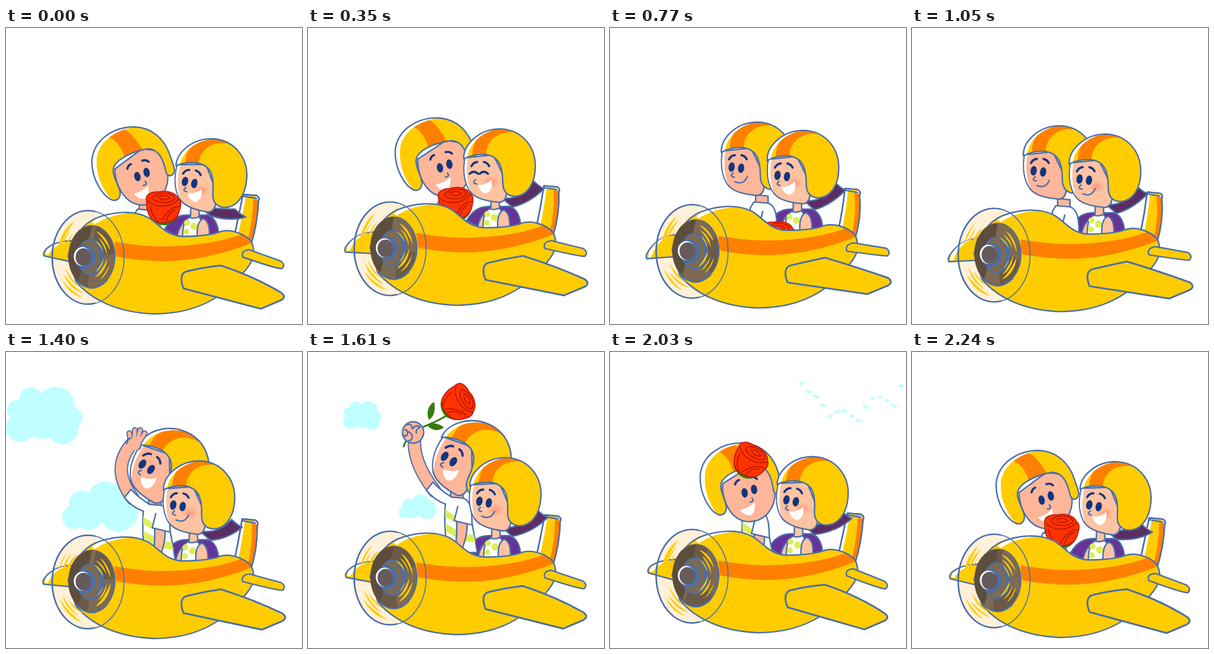
An HTML page for the animation above (2310 ms loop, 500 px wide and 500 px high).

```html
<!DOCTYPE html>
<html lang="en">
<head>
<meta charset="utf-8">
<title>Plane ride</title>
<style>
html, body { margin: 0; width: 100%; height: 100%; overflow: hidden; background: #fff; }
svg { display: block; width: 100vw; height: 100vh; }
.line { stroke: #4a6ea9; stroke-width: 2.4; stroke-linejoin: round; stroke-linecap: round; }
.none { fill: none; }
.brow { fill: none; stroke: #14357f; stroke-width: 3.6; stroke-linecap: round; }
.vein { stroke: #b31404; stroke-width: 1.5; stroke-linecap: round; }
</style>
</head>
<body>
<script>
const STEP = 70, COUNT = 33;
const YELLOW = '#ffcc00', ORANGE = '#ff8000', LIME = '#dcef56', BLUE = '#4a6ea9', NAVY = '#14357f';
const SKIN = '#ffb699', ROSY = '#ffc3a1', RED = '#ff3300', GREEN = '#347d0c', SKY = '#bfffff';

const path = (d, fill, cls = 'line', extra = '') => `<path d="${d}" fill="${fill}" class="${cls}" ${extra}/>`;
const flat = (d, fill) => path(d, fill, '');
const outline = d => path(d, 'none', 'line none');
const oval = (x, y, rx, ry, fill, extra = '') =>
  `<ellipse cx="${x}" cy="${y}" rx="${rx}" ry="${ry}" fill="${fill}" ${extra}/>`;
const group = (id, body = '') => `<g id="${id}">${body}</g>`;
const eye = (x, y, tilt) => oval(x, y, 5.3, 8, NAVY, `transform="rotate(${tilt} ${x} ${y})"`);

const helmet = (id, shell, stripe, shine) =>
  `<clipPath id="${id}"><path d="${shell}"/></clipPath>` + flat(shell, YELLOW) +
  `<g clip-path="url(#${id})">${flat(stripe, ORANGE)}${flat(shine, '#fff')}</g>` + outline(shell);

// Head seen from the side, centred on its helmet
const sideHead = (id, skin, blush) =>
  path('M-58 -12C-62 12 -59 30 -49 45C-39 59 -13 62 0 63C15 62 15 42 8 20L-10 -17Z', skin) +
  flat('M-57 -12C-61 12 -58 30 -48 45C-54 30 -57 12 -53 -12Z', '#fff') +
  (blush ? oval(-14, 28, 14, 11, 'url(#blush)') : '') +
  path('M-47 2Q-43 -5 -37 -5M-26 -5Q-20 -4 -17 2', 'none', 'brow') +
  group(id + 'Eyes', eye(-42.5, 15, 8) + eye(-26.5, 17, 8)) +
  group(id + 'Shut', path('M-50 15Q-43 8 -36 15M-33 15Q-26 8 -19 15', 'none', 'brow')) +
  outline('M-40 25Q-47 31 -38 32') +
  group(id + 'Smile', outline('M-37 40Q-22 46 -16 31')) +
  group(id + 'Grin', flat('M-36 35Q-22 34 -13 25Q-10 44 -22 48Q-32 47 -36 35Z', '#fff')) +
  helmet(id + 'Clip',
    'M-60 -10C-61 -33 -36 -60 0 -61C36 -61 61 -33 61 2C61 32 47 52 27 53C13 53 6 44 6 30C6 6 2 -16 -26 -18C-40 -18 -53 -14 -60 -10Z',
    'M-45 -14C-46 -38 -36 -52 -14 -60L0 -61Q19 -60 27 -55C0 -58 -22 -43 -22 -17Z',
    'M-60 -10C-61 -33 -36 -60 0 -61C-30 -56 -51 -36 -54 -11Z');

// Head tilted towards the other passenger
const leanHead =
  path('M184 238C183 262 200 300 232 299C262 297 276 270 273 245L262 208L230 204Z', SKIN) +
  path('M205 238Q206 232 211 230M230 224Q237 222 241 226', 'none', 'brow') +
  eye(222, 251, -12) + eye(237.5, 244, -12) +
  outline('M235 259Q240 265 232 266') +
  flat('M216 280Q231 276 240 266Q243 282 235 288Q224 290 216 280Z', '#fff') +
  helmet('leanClip',
    'M180 291C165 285 145 258 145 225C147 190 180 167 217 167C246 168 268 187 277 215C282 230 287 239 283 246C278 252 272 250 270 242C266 225 260 205 240 204C215 208 190 220 183 233C176 246 190 262 193 278C193 288 188 292 180 291Z',
    'M171 183L197 169C213 178 223 192 230 205L200 217C195 201 186 189 171 183Z',
    'M180 291C165 285 145 258 145 225C147 190 180 167 217 167C180 174 156 194 153 222C152 255 168 280 180 291Z');

const torso =
  path('M241 244L262 246L262 262L241 262Z', SKIN) +
  path('M238 256L262 258C275 262 277 280 277 300L286 350L236 350C231 320 230 290 232 266Z', '#fff') +
  flat('M231.5 277L249 289L249 299L231.5 290ZM232 301L254 313L252 326L233 314ZM266 319L280 320L283 333L266 331Z', LIME) +
  path('M251 297L269 301C269 325 262 336 259 350L246 350C251 335 252 320 251 297Z', SKIN) +
  path('M253 272L247 296L276 303', '#fff');

const sleeve = path('M242 256C226 246 217 238 211 231L200 245C209 256 221 264 232 268', '#fff');

const woman =
  path('M310 296L323 296L324 322L309 322Z', ROSY) +
  path('M286 358C287 343 291 335 298 328L301 358Z', ROSY) +
  path('M296 358C295 336 299 324 307 320Q315 323 323 319C331 325 331 342 328 358Z', '#fff') +
  oval(303, 329, 5, 5, LIME) + oval(315, 335, 6, 6, LIME) + oval(302, 344, 5, 5, LIME) +
  path('M321 358C319 337 323 325 331 322C340 326 342 338 341 358Z', ROSY);

const bloom =
  flat('M-24 14Q-18 28 -2 30Q14 32 24 15Q8 25 -24 14Z', GREEN) +
  path('M-29 -13C-31 -24 -16 -27 -8 -26C4 -29 20 -26 25 -15C32 -9 29 -2 27 6C23 22 10 27 -6 26C-18 25 -25 15 -28 2Z', RED, 'vein') +
  path('M-27 -12C-15 2 12 1 25 -13M-18 -16C-10 -28 17 -26 19 -15C14 -5 -14 -6 -18 -16M-10 -17Q2 -24 11 -16Q2 -10 -6 -15M-22 -1Q-20 15 -8 25M27 -1Q10 -2 -2 22M20 4Q8 8 5 23', 'none', 'vein');

const stem =
  path('M-18 20Q-40 33 -65 42Q-88 56 -92 74', 'none', '', `stroke="${GREEN}" stroke-width="3"`) +
  flat('M-49 28C-56 12 -46 -1 -40 -2C-39 13 -39 20 -49 28ZM-53 36C-45 31 -31 34 -24 41C-35 48 -45 46 -53 36Z', GREEN);

const limb = (d, w) => [[BLUE, w + 4], [SKIN, w]].map(([color, size]) =>
  path(d, 'none', '', `stroke="${color}" stroke-width="${size}" stroke-linecap="round"`)).join('');
const palm = limb('M-5 0L-9 -14M0 -2L0 -20M5 -2L9 -21M8 1L17 -16', 6) + oval(0, 3, 12, 11, SKIN) +
  outline('M-12 4Q-11 -5 -5 -6M12 3Q13 8 10 12');
const fist = oval(-3, -4, 18, 18, SKIN, 'class="line"') +
  outline('M-13 -17Q-6 -20 -4 -10M-4 -10Q2 -18 9 -13Q0 -8 3 -3M-19 1Q-13 5 -12 -4Q-15 -11 -17 -8M-10 10Q-3 10 -5 0Q-10 -7 -12 -4');

const fuselage =
  'M150 322C180 310 215 307 240 320C258 330 268 350 297 352C320 352 345 350 359 345C375 338 402 346 414 360C426 385 412 402 395 420C360 462 310 483 250 483C190 481 145 460 118 428L105 385C115 350 130 332 150 322Z';

const puffs = list => list.map(([x, y, r]) => oval(x, y, r, r, SKY)).join('');
const cloudA = puffs([[42, 80, 20], [84, 91, 32], [24, 128, 24], [62, 114, 33], [96, 130, 26], [110, 111, 19], [18, 97, 16]]);
const cloudB = puffs([[168, 250, 31], [128, 256, 22], [115, 279, 20], [140, 273, 27], [190, 270, 33]]);

let seed = 7;
const random = () => (seed = seed * 16807 % 2147483647) / 2147483647;
const bits = Array.from({ length: 18 }, (_, i) => {
  const x = 252 + i * 12, y = 44 + random() * 68;
  return oval(x, y, 3.5 + random() * 3, 2.5, SKY, `transform="rotate(${random() * 60 - 30} ${x} ${y})"`);
}).join('');

document.body.innerHTML = `<svg viewBox="0 0 500 500">
<defs><radialGradient id="blush"><stop offset="0" stop-color="#ff8a70" stop-opacity=".75"/><stop offset="1" stop-color="#ff8a70" stop-opacity="0"/></radialGradient>
<clipPath id="hull"><path d="${fuselage}"/></clipPath></defs>
${group('cloudA', cloudA)}${group('cloudB', cloudB)}${group('bits', bits)}
<g id="plane">
${oval(139, 387.5, 60.5, 79, '#fff0d9')}
${group('back')}
${path('M268 340C277 324 290 316 305 316L340 316C353 319 360 335 359 354L297 356Z', '#663399')}
${group('scarf')}
${group('torso', torso)}
${group('side', sideHead('man', SKIN, false))}
${group('lean', leanHead)}
${group('woman', woman)}
${group('lady', sideHead('lady', ROSY, true))}
${group('rose', group('stem', stem) + group('bloom', bloom))}
${group('arm', group('limb') + group('palm', palm) + group('fist', fist) + group('sleeve', sleeve))}
${flat(fuselage, YELLOW)}
<g clip-path="url(#hull)">${flat('M145 328Q165 312 200 311L205 313Q170 317 150 332Z', '#fff')}
${flat('M183 361Q230 369 265 369Q350 368 404 346L420 361Q340 394 262 394Q215 392 186 386Z', ORANGE)}</g>
${outline(fuselage)}
${group('wings')}
${group('prop')}
</g></svg>`;

const el = id => document.getElementById(id);
const show = (id, on) => el(id).setAttribute('visibility', on ? 'inherit' : 'hidden');
const move = (id, x, y, turn = 0, size = 1) =>
  el(id).setAttribute('transform', `translate(${x} ${y}) rotate(${turn}) scale(${size})`);
const ease = k => k * k * (3 - 2 * k);
const mix = (a, b, k) => a + (b - a) * k;

// Finds the two keys around a step and the eased share between them
function between(keys, f) {
  const i = keys.findIndex(key => key[0] > f);
  const [from, a] = keys[i - 1], [to, b] = keys[i];
  return [a, b, ease((f - from) / (to - from))];
}

// Poses: places are x, y, turn and size, measured on the resting plane
const kiss = { lady: [346, 248, 5], lean: [0, 0, 0], side: [244, 230, -8, 1], body: [-16, 50],
  arm: [190, 270, 215, 265], rose: [266, 303, 0], scarf: [405, 319] };
const hug = { ...kiss, lady: [323, 246, 0], lean: [1, 0, 3], rose: [250, 311, -5], scarf: [399, 286] };
const sit = { ...kiss, lady: [325.5, 244, 0], lean: [20, 2, 14], side: [248, 230, 0, 1], body: [5, 48],
  rose: [284, 364, 0], scarf: [398, 284] };
const wave = { ...sit, lady: [325.5, 244, 2], side: [278, 193, 25, 1.06], body: [0, 0],
  arm: [176, 196, 213, 154], rose: [284, 364, 60], scarf: [399, 295] };
const cheer = { ...wave, lady: [340, 246, 4], lean: [14, -8, 8], side: [279, 180, 25, 1.06], body: [0, -11],
  arm: [172, 182, 148, 137], rose: [221, 84, 60], scarf: [411, 275] };
const meet = { ...kiss, lady: [343, 247, 4], lean: [-3, 0, 0], rose: [253, 302, 0], scarf: [406, 305] };

const STORY = [[0, kiss], [5, hug], [11, sit], [15, sit], [20, wave], [26, cheer], [32, meet], [33, kiss]];
const BOB = [[0, 0], [5.5, -15], [20.5, 1], [26, -14.5], [33, 0]];

function poseAt(f) {
  const [a, b, k] = between(STORY, f), pose = {};
  for (const part in a) pose[part] = a[part].map((v, i) => mix(v, b[part][i], k));
  return pose;
}

const spot = (cx, cy, r, deg) => {
  const a = deg * Math.PI / 180;
  return `${(cx + r * Math.cos(a)).toFixed(1)} ${(cy + r * 1.3 * Math.sin(a)).toFixed(1)}`;
};
const sliver = (cx, cy, r, a, b) =>
  `M${spot(cx, cy, r, a)}A${r} ${r * 1.3} 0 0 1 ${spot(cx, cy, r, b)}A${r * 2.6} ${r * 3.4} 0 0 0 ${spot(cx, cy, r, a)}Z`;

function propeller(f) {
  const jig = i => Math.sin(f * 2.4 + i * 1.9) * 8;
  let arcs = '';
  for (let i = 0; i < 3; i++) {
    const outer = 41 + i * 6, inner = 22 + i * 6;
    arcs += sliver(139, 388, outer, 186 + jig(i), 236 + jig(i + 2)) + sliver(139, 388, outer, 104 + jig(i + 1), 154 + jig(i + 4)) +
      sliver(143, 386, inner, -70 + jig(i), -12 + jig(i + 3)) + sliver(143, 386, inner, 10 + jig(i + 2), 68 + jig(i));
  }
  const wedge = a => `M145 386L${spot(145, 386, 40, a)}A40 52 0 0 1 ${spot(145, 386, 40, a + 75)}Z`;
  return oval(145, 386, 40, 53, '#7d6a52') +
    flat(wedge(f * 54 + 100) + wedge(f * 54 + 280), '#6b5a47') +
    flat('M145 334A40 52 0 0 0 122 428L134 386Z', '#5d4d3d') +
    flat('M150 333.5A40 53 0 0 1 150 438.5Q182 425 182.5 386Q182 346 150 333.5Z', BLUE) +
    outline('M118 426Q145 452 170 427') +
    oval(143, 387, 22, 30, '#7d6a52', 'class="line"') +
    flat('M145 358Q186 386 145 416Q174 386 145 358Z', BLUE) +
    flat(arcs, YELLOW) +
    oval(133, 387, 18, 20, BLUE) + oval(129, 386, 14.5, 16, '#fff') + oval(131, 387, 13.5, 15, '#655b5c') +
    oval(139, 387.5, 60.5, 79, 'none', 'class="line" style="stroke-width:1.6"') +
    outline('M150 310A60.5 79 0 1 0 150 465');
}

function wings(r) {
  const x = 472.5 - 3 * r, y = 449 + 9 * r, bx = 432 - 2.5 * r, by = 468.5 + 9 * r;
  const sx = 471 - 1.5 * r, sy = 393 + 7 * r;
  return path(`M300 440C294 426 295 413 306 411Q335 404 363 ${400 + 2 * r}Q420 ${418 + 3 * r} ${x - 6} ${y - 8}Q${x + 4} ${y - 1} ${x - 6} ${y + 5}L${bx} ${by}Z`,
    YELLOW, 'line', 'style="stroke-width:3"') +
    path(`M400 387Q396 376 411 ${374 + r}L${sx - 6} ${sy - 4}Q${sx + 3} ${sy + 3} ${sx - 4} ${sy + 9}Q${sx - 14} ${sy + 9} 400 387Z`, YELLOW);
}

function backParts(r) {
  const tip = 63.5 + 1.5 * r, top = 379 - 8 * r, low = 391 - 9 * r, lx = 399 + 2 * r, rx = 424.5 + 3 * r;
  const fin = `M385 355Q393 318 ${lx} 281L${rx - 3} 283Q${rx + 3} 287 ${rx} 292Q425 330 414 365Z`;
  return path(`M115 359Q82 360 ${tip + 3} ${top}Q${tip - 3} ${low - 5} ${tip} ${low}L115 396Z`, YELLOW) +
    flat(`M${tip + 4} ${top + 1}Q82 362 104 361Q82 365 ${tip + 7} ${low - 2}L${tip + 2} ${low - 2}Z`, '#fff') +
    path(fin, '#fff') + flat(`M391 355Q399 318 ${lx + 5} 283L${rx - 4} 284L411 364Z`, YELLOW) +
    flat(`M${rx - 9} 289L${rx} 290Q425 330 414 363L408 360Q417 325 ${rx - 9} 289Z`, ORANGE) +
    outline(fin + `M${lx} 284L${rx - 3} 288`);
}

function drawLady(f, pose) {
  const blink = f >= 4 && f <= 6, glad = f < 13 || f >= 29;
  move('lady', ...pose.lady);
  move('woman', (pose.lady[0] - 325.5) * 0.12, 0);
  show('ladyEyes', !blink);
  show('ladyShut', blink);
  show('ladyGrin', glad);
  show('ladySmile', !glad);
  const [x, y] = pose.scarf;
  el('scarf').innerHTML = path(`M328 302Q360 306 ${x - 18} ${y - 13}Q${x - 8} ${y - 3} ${x} ${y}Q${x - 26} ${(y + 336) / 2} 345 317Z`, '#5b2d62');
}

function drawMan(f, pose) {
  const leaning = f < 8 || f >= 29, raised = f >= 17 && !leaning, holding = raised && f >= 22;
  const [bx, by] = pose.body, [dx, dy, tilt] = pose.lean;
  let [ex, ey, hx, hy] = pose.arm, [rx, ry, turn] = pose.rose;

  show('lean', leaning);
  el('lean').setAttribute('transform', `translate(${dx} ${dy}) rotate(${tilt} 225 250)`);
  show('side', !leaning);
  move('side', ...pose.side);
  show('manShut', false);
  show('manGrin', raised);
  show('manSmile', !leaning && !raised);
  move('torso', bx, by);

  if (!holding) hx += Math.sin((f - 20) * 1.5) * 6;
  el('limb').innerHTML = limb(`M${214 + bx} ${246 + by}Q${ex} ${ey} ${hx} ${hy}`, 19);
  move('palm', hx + 3, hy - 3, 5);
  move('fist', hx, hy);
  move('sleeve', bx, by);
  show('arm', raised);
  show('palm', raised && !holding);
  show('fist', holding);

  if (holding) [rx, ry] = [hx + 73, hy - 53];
  move('rose', rx, ry);
  move('bloom', 0, 0, turn);
  show('rose', f < 14 || holding || f >= 29);
  show('stem', holding);
}

function drawSky(f) {
  const size = 1 - Math.max(0, Math.abs(f - 20.5) - 0.5) * 0.25, drift = Math.max(0, f - 20) * 9;
  for (const [id, x, y] of [['cloudA', 65, 107], ['cloudB', 158, 262]]) {
    show(id, f >= 18 && f <= 23);
    el(id).setAttribute('transform', `translate(${x + drift} ${y}) scale(${size}) translate(${-x} ${-y})`);
  }
  show('bits', f >= 24 && f <= 29);
  move('bits', (f - 26) * 24, (f - 26) * 3);
}

function draw(f) {
  const roll = Math.cos(2 * Math.PI * (f - 28.5) / COUNT), pose = poseAt(f);
  move('plane', 0, mix(...between(BOB, f)));
  el('back').innerHTML = backParts(roll);
  el('wings').innerHTML = wings(roll);
  el('prop').innerHTML = propeller(f);
  drawLady(f, pose);
  drawMan(f, pose);
  drawSky(f);
}

let last = -1;
const start = performance.now();
function tick() {
  const f = Math.floor((performance.now() - start) / STEP) % COUNT;
  if (f !== last) draw(last = f);
  requestAnimationFrame(tick);
}
tick();
</script>
</body>
</html>
```
